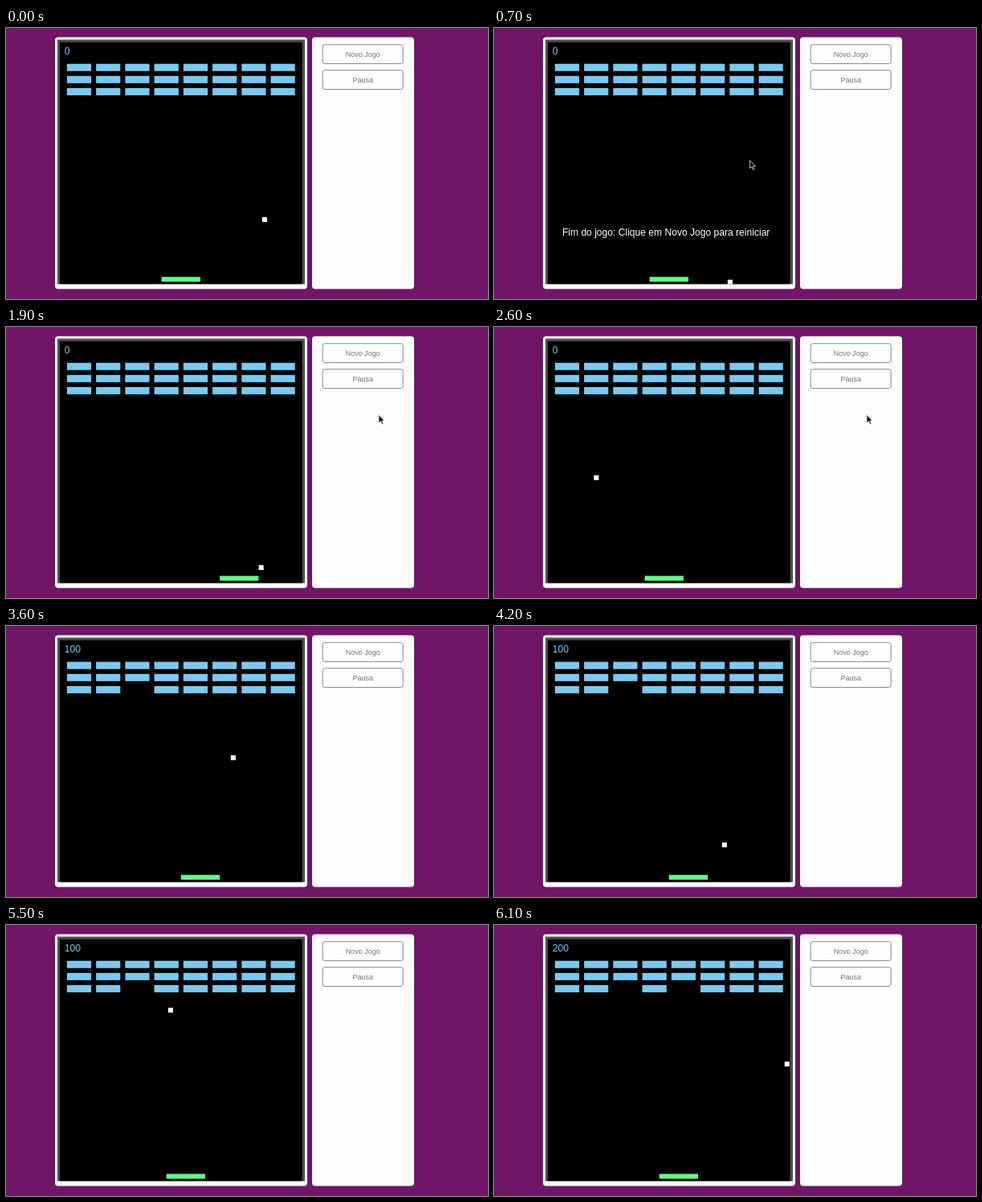
Write an HTML page that moves like this. It is 600x338 px and loops after 6200 ms.

```html
<!DOCTYPE html>
<html lang="pt">
<meta charset="utf-8">
<title>Breakout</title>
<style>
  html, body { margin: 0; width: 100%; height: 100%; overflow: hidden; background: #6f1667; }
  svg { display: block; font-family: "Liberation Sans", Arial, sans-serif; }
  .button rect { fill: #fdfdfd; stroke: #848a90; }
  .button text { fill: #6c757d; font-size: 9px; text-anchor: middle; }
  .button.hover rect { fill: #6c757d; stroke: #6c757d; }
  .button.hover text { fill: #fff; }
</style>
<svg width="600" height="338" viewBox="0 0 600 338">
  <rect x="61" y="11.5" width="314" height="314" rx="4" fill="#fff"/>
  <rect x="381" y="11.5" width="127" height="314" rx="4" fill="#fdfdfd"/>
  <rect x="64" y="14.5" width="308" height="305" fill="#505050"/>
  <svg x="66.8" y="17.5" width="302" height="302" viewBox="0 0 500 500">
    <rect width="500" height="500"/>
    <g id="bricks" fill="#7cc8ee"></g>
    <text id="score" x="10" y="25" font-size="20" fill="#7cc8ee"></text>
    <text id="message" x="30" y="400" font-size="20" fill="#fff">Fim do jogo: Clique em Novo Jogo para reiniciar</text>
    <rect id="paddle" y="485" width="80" height="10" fill="#62ff8b"/>
    <rect id="ball" width="10" height="10" fill="#fff"/>
  </svg>
  <g class="button">
    <rect x="394.2" y="20.7" width="100" height="23.8" rx="2.5"/>
    <text x="444.2" y="35.8">Novo Jogo</text>
  </g>
  <g class="button">
    <rect x="394.2" y="52.7" width="100" height="23.8" rx="2.5"/>
    <text x="444.2" y="67.8">Pausa</text>
  </g>
  <g id="cursor" stroke-linejoin="round">
    <path id="arrow" d="M0 0V10L2.4 8L4 11.8L5.6 11L4 7.4H7Z" fill="#111" stroke="#ddd" stroke-width=".8"/>
    <path id="hand" d="M-.8 .6Q0-.6 .9 .6V4L5.4 5Q6.4 5.4 6 7L5 11H.6L-2.6 6.6Q-2.4 5.4-.8 6.4Z" fill="#fff" stroke="#222" stroke-width=".8"/>
  </g>
</svg>
<script>
  const LOOP = 6200, TICK = 100, OVER = 430, RESTART = 1174;
  const VX = .45, VY = .3; // field units per ms
  const LEFT = 4, WIDTH = 492, TOP = 112.6, HEIGHT = 367.4;
  const HITS = [{ brick: 18, at: 3166 }, { brick: 20, at: 5616 }];
  const PADDLE = [[1600, 210], [1900, 330], [1950, 330], [2400, 200], [3250, 200], [3550, 250],
    [4250, 250], [4500, 220], [4700, 200], [5400, 200], [5600, 230]];
  const POINTER = [[500, 520, 215], [600, 400, 190], [700, 318.5, 165], [800, 400, 90], [900, 450, 34],
    [1000, 450, 34], [1100, 451, 40], [1300, 451, 63], [1700, 464, 109.5], [2600, 464, 109.5], [3000, 602, 150]];

  const $ = id => document.getElementById(id);
  const show = (el, on) => el.setAttribute("visibility", on ? "visible" : "hidden");
  const place = (el, x, y) => { el.setAttribute("x", x); el.setAttribute("y", y); };
  const buttons = [...document.querySelectorAll(".button")];

  const bricks = Array.from({ length: 24 }, (_, i) => {
    const brick = document.createElementNS("http://www.w3.org/2000/svg", "rect");
    place(brick, 15 + i % 8 * 60, 45 + Math.floor(i / 8) * 25);
    brick.setAttribute("width", 50);
    brick.setAttribute("height", 15);
    return $("bricks").appendChild(brick);
  });

  // Bounces a distance back and forth between 0 and size.
  function fold(d, size) {
    const m = d % (2 * size);
    return m < size ? m : 2 * size - m;
  }

  function along(keys, t) {
    const i = keys.findIndex(k => k[0] > t);
    if (i < 0) return keys[keys.length - 1].slice(1);
    if (i === 0) return keys[0].slice(1);
    const a = keys[i - 1], b = keys[i], p = (t - a[0]) / (b[0] - a[0]);
    return a.slice(1).map((v, j) => v + (b[j + 1] - v) * p);
  }

  function ballAt(t) {
    if (t < RESTART) {
      const s = Math.min(t, OVER);
      return [LEFT + fold(422.5 - LEFT + VX * s, WIDTH), 366.7 + VY * s];
    }
    const s = t - RESTART;
    return [LEFT + fold(250 - LEFT + VX * s, WIDTH), TOP + fold(250 - TOP + VY * s, HEIGHT)];
  }

  function draw(t) {
    const [bx, by] = ballAt(t);
    place($("ball"), bx - 5, by - 5);
    place($("paddle"), Math.round(along(PADDLE, t)[0] / 10) * 10, 485);

    const hits = HITS.filter(h => t >= h.at);
    bricks.forEach((b, i) => show(b, !hits.some(h => h.brick === i)));
    $("score").textContent = hits.length * 100;
    show($("message"), t >= OVER && t < RESTART);

    const [x, y] = along(POINTER, t);
    const visible = t >= POINTER[0][0] && x < 600;
    const over = [20, 52].map(top => visible && x > 394 && x < 495 && y > top && y < top + 25);
    buttons.forEach((b, i) => b.classList.toggle("hover", over[i]));
    $("cursor").setAttribute("transform", `translate(${x} ${y})`);
    show($("hand"), over.includes(true));
    show($("arrow"), visible && !over.includes(true));
  }

  const start = performance.now();
  function frame() {
    const t = (performance.now() - start) % LOOP;
    draw(Math.floor(t / TICK) * TICK);
    requestAnimationFrame(frame);
  }
  frame();
</script>
</html>
```
